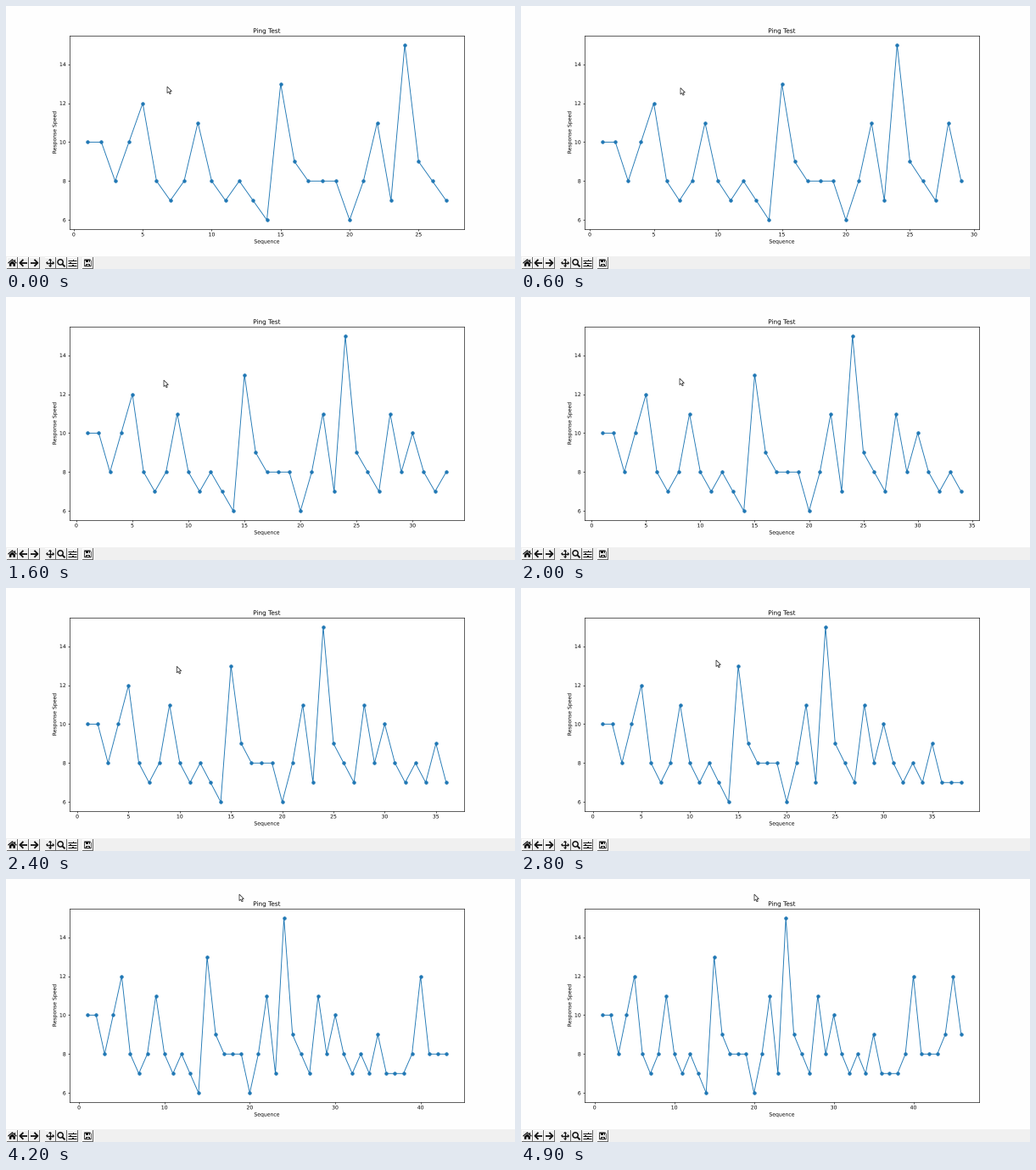
Recreate the animation shown at these times as a matplotlib script. Size 600 by 310 pixels, loop 5 s.

```python
import matplotlib.pyplot as plt
import numpy as np
from matplotlib.animation import FuncAnimation
from matplotlib.patches import Circle, Polygon, Rectangle
from matplotlib.patheffects import Normal

W, H, DPI = 600, 310, 100
BAR_TOP = 295            # top of the toolbar, in pixels
S = 600 / 1366           # the window is shown scaled down
PX = 72 / DPI            # one pixel in points
FRAMES, INTERVAL = 50, 100
BLUE = "#1f77b4"
INK = "#111111"

PING = [10, 10, 8, 10, 12, 8, 7, 8, 11, 8, 7, 8, 7, 6, 13, 9,
        8, 8, 8, 6, 8, 11, 7, 15, 9, 8, 7, 11, 8, 10, 8, 7,
        8, 7, 9, 7, 7, 7, 8, 12, 8, 8, 8, 9, 12, 9]

# Pointer path: time in frames, x, y
MOVE_T = [0, 5, 7, 17, 19, 23, 26, 39, 41]
MOVE_X = [190, 190, 186, 186, 187, 187, 230, 230, 275]
MOVE_Y = [95, 95, 98, 98, 96, 96, 85, 85, 18]
POINTER = np.array([(0, 0), (0, 7.6), (1.8, 6), (3, 8.7),
                    (4.3, 8.1), (3.1, 5.5), (5.4, 5.4)])

plt.rcParams.update({
    "font.family": "DejaVu Sans",
    "font.size": 10 * S,
    "text.hinting": "no_hinting",
    "toolbar": "None",
    "axes.linewidth": 0.45,
    "axes.titlepad": 6 * S,
    "axes.labelpad": 4 * S,
})
for axis in ("xtick", "ytick"):
    plt.rcParams.update({
        f"{axis}.major.size": 3.5 * S,
        f"{axis}.major.width": 0.45,
        f"{axis}.major.pad": 3.5 * S,
    })

fig = plt.figure(figsize=(W / DPI, H / DPI), dpi=DPI, facecolor="#fefefe")


def smooth(*texts):
    """Draw text as outlines so that it keeps its sub-pixel position."""
    for text in texts:
        text.set_path_effects([Normal()])


# Chart
bottom = H - BAR_TOP + 0.11 * BAR_TOP
ax = fig.add_axes([0.125, bottom / H, 0.775, 0.77 * BAR_TOP / H])
ax.set_ylim(5.55, 15.45)
ax.set_yticks(range(6, 15, 2))
smooth(ax.set_title("Ping Test", fontsize=12 * S),
       ax.set_xlabel("Sequence"),
       ax.set_ylabel("Response Speed"))
line, = ax.plot([], [], color=BLUE, lw=1.5 * S)
dots = ax.scatter([], [], s=(6 * S) ** 2, color=BLUE, linewidths=S, zorder=3)

# Overlay in pixel coordinates
top = fig.add_axes([0, 0, 1, 1], zorder=5)
top.set(xlim=(0, W), ylim=(H, 0))
top.axis("off")


def box(x, y, w, h, color):
    top.add_patch(Rectangle((x, y), w, h, fc=color, lw=0))


def shape(points, color=INK):
    top.add_patch(Polygon(points, closed=True, fc=color, lw=0))


def stroke(xs, ys, width=1.0):
    top.plot(xs, ys, color=INK, lw=width * PX, solid_capstyle="butt")


def button(x):
    box(x, 296, 13, 13.5, "#6a6a6a")
    box(x, 296, 12.3, 12.8, "#ffffff")
    box(x + 0.8, 296.8, 11.5, 12, "#f0f0f0")


def home(x, y):
    stroke([x - 5, x, x + 5], [y + 0.4, y - 3.9, y + 0.4], 1.2)
    box(x + 2.2, y - 4, 1.3, 2.6, INK)
    shape([(x - 3.5, y + 0.6), (x, y - 2.4), (x + 3.5, y + 0.6),
           (x + 3.5, y + 4), (x + 1, y + 4), (x + 1, y + 1.4),
           (x - 1, y + 1.4), (x - 1, y + 4), (x - 3.5, y + 4)])


def arrow(x, y, d):
    stroke([x - 4.2 * d, x + 3.6 * d], [y, y], 1.8)
    stroke([x, x + 4 * d, x], [y - 4, y, y + 4], 1.8)


def pan(x, y):
    stroke([x - 4, x + 4], [y, y], 1.3)
    stroke([x, x], [y - 4, y + 4], 1.3)
    for dx, dy in ((1, 0), (-1, 0), (0, 1), (0, -1)):
        tip = np.array([x + 5 * dx, y + 5 * dy])
        back, side = np.array([dx, dy]) * 2.2, np.array([dy, dx]) * 2.1
        shape([tip, tip - back + side, tip - back - side])


def zoom(x, y):
    top.add_patch(Circle((x - 0.9, y - 0.9), 3.1, fc="none", ec=INK,
                         lw=1.5 * PX))
    stroke([x + 1.3, x + 4.5], [y + 1.3, y + 4.5], 1.9)


def sliders(x, y):
    for dy, knob in ((-3, 1.6), (0, -2.2), (3, 0.8)):
        stroke([x - 4.6, x + 4.6], [y + dy, y + dy], 1.0)
        box(x + knob - 0.9, y + dy - 1.2, 1.8, 2.4, INK)


def save(x, y):
    shape([(x - 4.2, y - 4.2), (x + 2.6, y - 4.2), (x + 4.2, y - 2.6),
           (x + 4.2, y + 4.2), (x - 4.2, y + 4.2)])
    box(x - 3.2, y - 3.2, 6.4, 6.4, "#f0f0f0")
    box(x - 2.4, y - 3.6, 4.6, 3, INK)
    box(x + 0.3, y - 3.2, 1.1, 2, "#f0f0f0")
    box(x - 2.6, y + 0.8, 5.2, 3, INK)
    box(x - 1.7, y + 1.7, 3.4, 1.7, "#f0f0f0")


box(0, BAR_TOP, W, H - BAR_TOP, "#f0f0f0")
for left in (1, 14, 27, 45.5, 58.5, 71.5, 90):
    button(left)
mid = 302.8
home(7.4, mid)
arrow(20.4, mid, -1)
arrow(33.4, mid, 1)
pan(52, mid)
zoom(65, mid)
sliders(78, mid)
save(96.4, mid)

pointer = top.add_patch(Polygon(POINTER, closed=True, fc="white",
                                ec="#333333", lw=0.8 * PX))


def update(frame):
    n = int(27.08 + 0.39 * frame)
    xs = np.arange(1, n + 1)
    line.set_data(xs, PING[:n])
    dots.set_offsets(np.column_stack([xs, PING[:n]]))
    margin = 0.05 * (n - 1)
    ax.set_xlim(1 - margin, n + margin)
    smooth(*ax.get_xticklabels(), *ax.get_yticklabels())
    tip = [np.interp(frame, MOVE_T, MOVE_X), np.interp(frame, MOVE_T, MOVE_Y)]
    pointer.set_xy(POINTER + tip)
    return line, dots, pointer


anim = FuncAnimation(fig, update, frames=FRAMES, interval=INTERVAL,
                     repeat=True, repeat_delay=0, blit=False)
plt.show()
```
